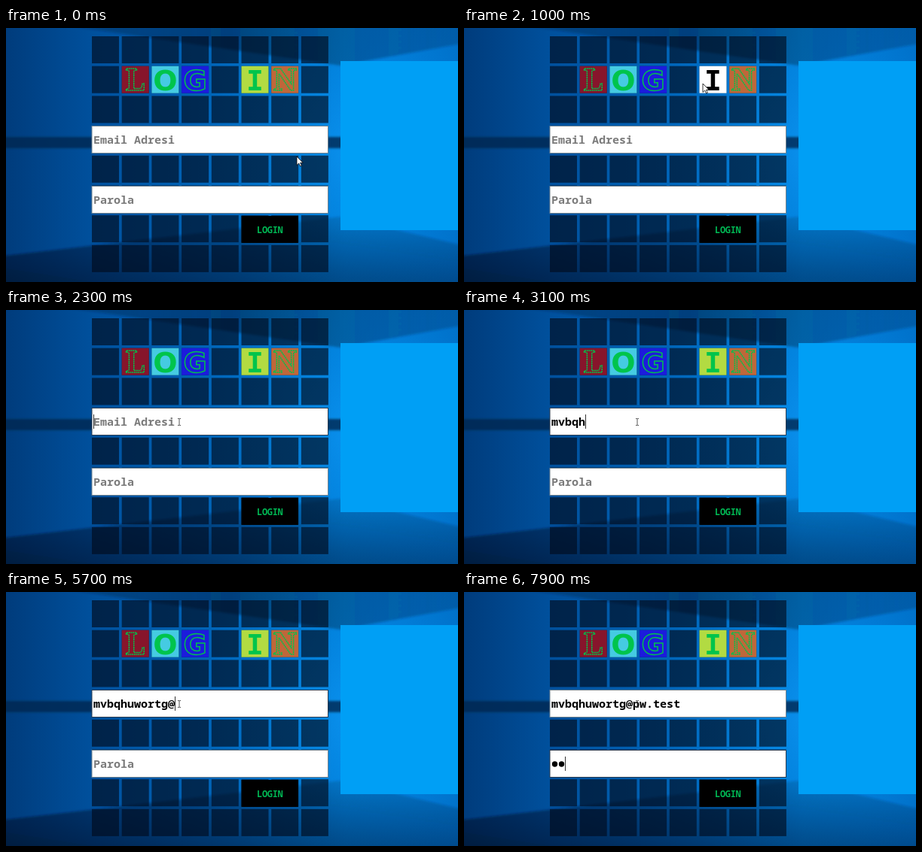
Write an HTML page that moves like this. It is 600 by 338 pixels and loops after 8000 ms.

```html
<!DOCTYPE html>
<html lang="tr">
<head>
<meta charset="utf-8">
<title>Log in</title>
<style>
html, body { margin: 0; width: 100%; height: 100%; overflow: hidden; background: #004084; }
svg { display: block; width: 100vw; height: 100vh; }
.field { font: bold 15px "Noto Sans Mono", "DejaVu Sans Mono", monospace; white-space: pre; }
.letter { font-weight: bold; text-anchor: middle; }
.button { font: bold 12px "Noto Sans Mono", monospace; letter-spacing: -.3px; fill: #00b653; }
</style>
</head>
<body>
<svg id="stage" viewBox="0 0 600 338">
  <defs>
    <linearGradient id="base">
      <stop offset="0" stop-color="#003c7c"/>
      <stop offset=".2" stop-color="#00519e"/>
      <stop offset=".5" stop-color="#0068bd"/>
      <stop offset=".75" stop-color="#0082dc"/>
      <stop offset="1" stop-color="#0070c8"/>
    </linearGradient>
    <radialGradient id="glow" gradientUnits="userSpaceOnUse" cx="470" cy="160" r="230">
      <stop offset="0" stop-color="#14a0ff" stop-opacity=".55"/>
      <stop offset="1" stop-color="#0078d7" stop-opacity="0"/>
    </radialGradient>
    <linearGradient id="floor" x1="0" y1="1" x2="1" y2="0">
      <stop offset="0" stop-color="#001228" stop-opacity=".75"/>
      <stop offset=".5" stop-color="#001a3a" stop-opacity=".45"/>
      <stop offset="1" stop-color="#00264f" stop-opacity=".1"/>
    </linearGradient>
    <linearGradient id="ceiling">
      <stop offset="0" stop-color="#001c3e" stop-opacity=".2"/>
      <stop offset=".45" stop-color="#001c3e" stop-opacity=".5"/>
      <stop offset="1" stop-color="#00264f" stop-opacity=".25"/>
    </linearGradient>
    <filter id="soft" x="-10%" y="-10%" width="120%" height="120%"><feGaussianBlur stdDeviation="1.5"/></filter>
  </defs>
  <rect width="600" height="338" fill="url(#base)"/>
  <rect width="600" height="338" fill="url(#glow)"/>
  <g filter="url(#soft)">
    <path d="M40-9L444 50L609 20V-9Z" fill="url(#ceiling)"/>
    <path d="M-9 304L444 251L609 290V347H-9Z" fill="url(#floor)"/>
    <rect x="-9" y="145" width="618" height="15" fill="#002650" opacity=".8"/>
  </g>
  <rect x="444" y="44" width="225" height="225" fill="#009ff5"/>
  <g id="grid"></g>
  <g id="tiles"></g>
  <g id="fields"></g>
  <rect x="312.5" y="250" width="75.5" height="36"/>
  <text class="button" x="333" y="272.5">LOGIN</text>
  <path id="caret" stroke="#333"/>
  <path id="arrow" d="M0 0V11.5L2.7 9L4.6 13L6.4 12.2L4.6 8.3H8.2Z" fill="#fff" stroke="#000" stroke-width=".8"/>
  <path id="beam" d="M-2-4.5H-.6L0-4L.6-4.5H2M0-4V4M-2 4.5H-.6L0 4L.6 4.5H2" fill="none" stroke="#444" stroke-width=".9"/>
</svg>
<script>
const LOOP = 8000, PITCH = 39.7, CELL = 36, LEFT = 114, TOP = 11;
const $ = id => document.getElementById(id);

function add(parent, tag, attrs, text = '') {
  const el = document.createElementNS('http://www.w3.org/2000/svg', tag);
  for (const key in attrs) el.setAttribute(key, attrs[key]);
  el.textContent = text;
  return $(parent).appendChild(el);
}

const colX = c => LEFT + c * PITCH, rowY = r => TOP + r * PITCH;

for (let r = 0; r < 8; r++)
  for (let c = 0; c < 8; c++)
    add('grid', 'rect', { x: colX(c), y: rowY(r), width: CELL, height: CELL, fill: '#000c1e', 'fill-opacity': .65 });

// column, letter, font, tile colour, letter fill, outline dash (null = no outline)
const GREEN = '#00c44c';
const SLAB = '40px "Noto Serif", serif', SANS = '38px "DejaVu Sans", sans-serif', MONO = '38px "DejaVu Sans Mono", monospace';
const tiles = [
  [1, 'L', SLAB, '#87152b', 'none', '2 .7'],
  [2, 'O', SANS, '#45cbe2', GREEN, null],
  [3, 'G', SANS, '#1c1cdc', 'none', 'none'],
  [5, 'I', MONO, '#b2db42', GREEN, null],
  [6, 'N', SLAB, '#bf673a', 'none', '2 .7']
].map(([col, letter, font, color, fill, dash]) => {
  const x = colX(col), y = rowY(1);
  const box = add('tiles', 'rect', { x, y, width: CELL, height: CELL });
  const glyph = add('tiles', 'text', { class: 'letter', x: x + CELL / 2, y: y + 32, 'stroke-width': 1.5 }, letter);
  glyph.style.font = 'bold ' + font;
  if (dash) glyph.setAttribute('stroke-dasharray', dash);
  return { x, y, box, glyph, color, fill, outlined: dash !== null };
});

const fields = [[3, 'Email Adresi'], [5, 'Parola']].map(([row, hint]) => {
  const y = Math.round(rowY(row)) + .5;
  return {
    y, hint,
    box: add('fields', 'rect', { x: 114, y, width: 313.5, height: 36, fill: '#fff' }),
    label: add('fields', 'text', { class: 'field', x: 116, y: y + 23.5 })
  };
});

const email = 'mvbqhuwortg@pw.test', FOCUS = 2300, TAB = 7200;
const emailKeys = [...email].map((_, i) =>
  i < 11 ? 2710 + 84 * i : i === 11 ? 5520 : 6150 + 120 * (i - 12));
const passKeys = [7620, 7800];
const dots = passKeys.map((_, i) => add('fields', 'circle', { cx: 120.5 + 9 * i, cy: 229, r: 3.7 }));

// time, x, y of the pointer
const path = [[0, 386, 171], [100, 386, 171], [900, 317, 74], [1100, 317, 74], [1700, 238, 124], [2100, 230, 149], [LOOP, 230, 149]];

function pointer(t) {
  const i = path.findIndex(p => p[0] > t);
  const [t0, x0, y0] = path[i - 1], [t1, x1, y1] = path[i];
  const k = (t - t0) / (t1 - t0), e = k * k * (3 - 2 * k);
  return [x0 + (x1 - x0) * e, y0 + (y1 - y0) * e];
}

function draw(t) {
  const [px, py] = pointer(t);
  const inside = (x, y, w) => px >= x && px < x + w && py >= y && py < y + CELL;

  for (const { x, y, box, glyph, color, fill, outlined } of tiles) {
    const hover = inside(x, y, CELL);
    box.setAttribute('fill', hover ? '#fff' : color);
    glyph.setAttribute('fill', hover ? '#000' : fill);
    glyph.setAttribute('stroke', outlined && !hover ? GREEN : 'none');
  }

  const typed = keys => keys.filter(k => k <= t).length;
  const counts = [typed(emailKeys), typed(passKeys)];
  const values = [email.slice(0, counts[0]), ''];
  const focus = t < FOCUS ? -1 : t < TAB ? 0 : 1;
  fields.forEach(({ box, label, hint }, i) => {
    box.setAttribute('stroke', i === focus ? '#2c3c50' : '#71828f');
    label.textContent = values[i] || (counts[i] ? '' : hint);
    label.setAttribute('fill', counts[i] ? '#000' : '#7b7b7b');
  });
  dots.forEach((dot, i) => dot.setAttribute('visibility', i < counts[1] ? 'visible' : 'hidden'));

  // The caret restarts its blink at every key press
  const last = Math.max(...[FOCUS, TAB, ...emailKeys, ...passKeys].filter(k => k <= t));
  const lit = focus >= 0 && (t - last) % 1060 < 530;
  $('caret').setAttribute('d', lit ? `M${116.5 + 9 * counts[focus]} ${fields[focus].y + 8.5}v19` : '');

  const overField = fields.some(f => inside(LEFT, f.y, 314));
  for (const [id, on] of [['arrow', !overField], ['beam', overField]]) {
    $(id).setAttribute('transform', `translate(${px} ${py})`);
    $(id).setAttribute('visibility', on ? 'visible' : 'hidden');
  }
}

function tick() {
  draw(performance.now() % LOOP);
  requestAnimationFrame(tick);
}
tick();
</script>
</body>
</html>
```
